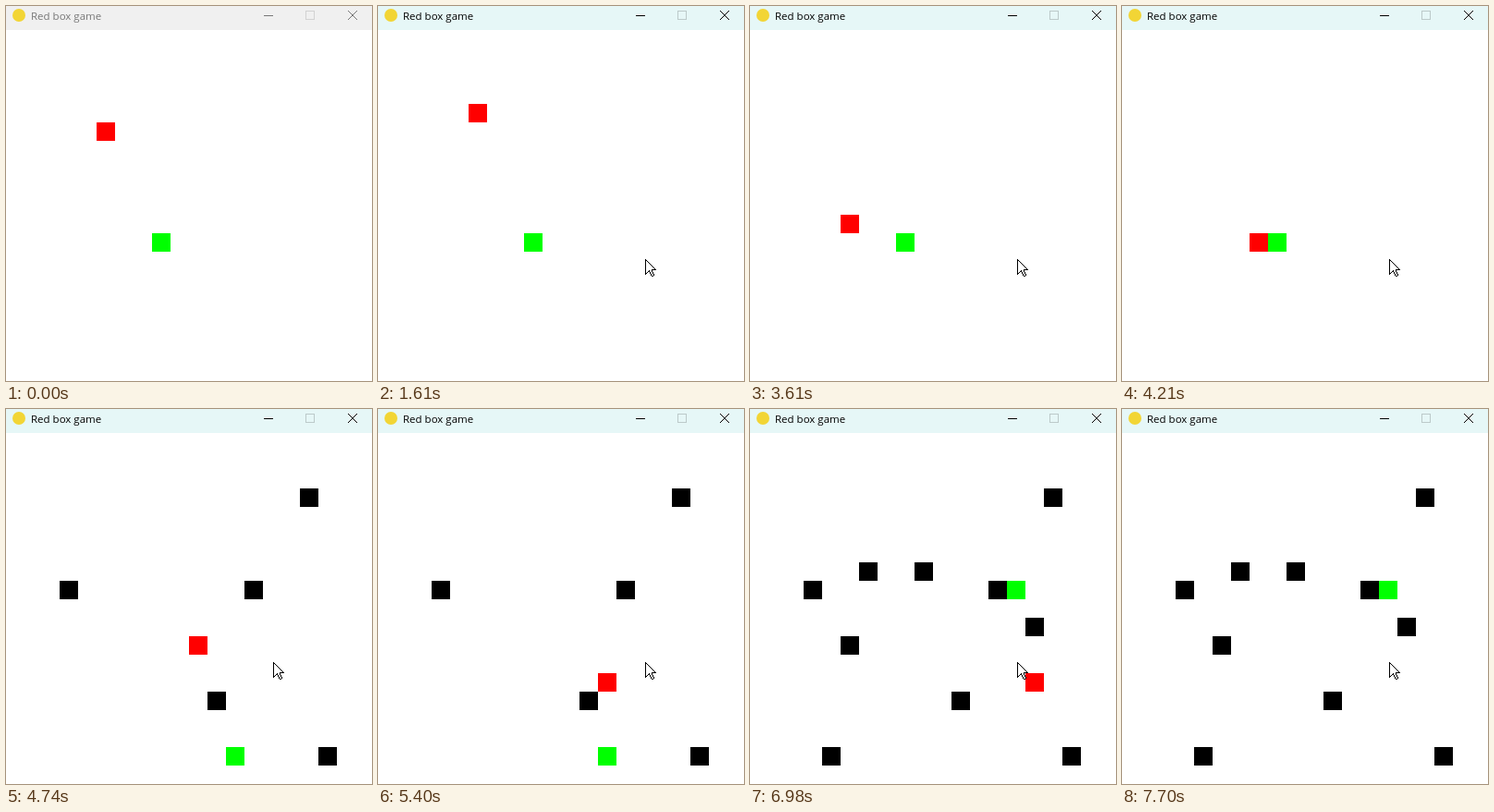
Recreate the animation shown at these times as an HTML page with a canvas. Size 396 by 406 pixels, loop 8 s.

```html
<!DOCTYPE html>
<html lang="en">
<head>
<meta charset="utf-8">
<title>Red box game</title>
<style>
  html, body { margin: 0; width: 100%; height: 100%; overflow: hidden; background: #fff; }
  canvas { display: block; }
</style>
</head>
<body>
<canvas id="stage" width="396" height="406"></canvas>
<script>
const ctx = document.getElementById('stage').getContext('2d');
const LOOP = 8000;
const CELL = 20;
const ORIGIN = { x: -2, y: 26 };
const DIRS = { U: [0, -1], D: [0, 1], R: [1, 0] };

// Steering of the red box, and how long it waits between moves
const ROUTE = 'U'.repeat(3) + 'D'.repeat(9) + 'R'.repeat(7) +
              'D'.repeat(6) + 'U'.repeat(4) + 'R'.repeat(8);
const PACE = [
  { from: 1610, waits: [200] },
  { from: 4410, waits: [130, 200] },
  { from: 5730, waits: [140, 130, 200] },
  { from: 6200, waits: [130, 130, 130, 130, 130, 130, 200] }
];

// Each round places one food and adds its walls, as [column, row]
const ROUNDS = [
  { food: [8, 11], walls: [] },
  { food: [12, 17], walls: [[16, 3], [3, 8], [13, 8], [11, 14], [17, 17]] },
  { food: [14, 8], walls: [[6, 7], [9, 7], [15, 10], [5, 11], [4, 17]] }
];

const ACTIVE_AT = 480;
const POINTER = { start: 130, end: 410, tick: 70, from: [300, 353], to: [289, 274] };

const same = (a, b) => a[0] === b[0] && a[1] === b[1];

// Plays the game once: walls come with the hit, the new food one move later
function play() {
  let t = PACE[0].from, red = [5, 5], food = 0, round = 0, beat = 0, pace = PACE[0];
  const states = [{ at: 0, red, food, round }];
  for (const key of ROUTE) {
    red = red.map((v, i) => v + DIRS[key][i]);
    food = round;
    if (same(red, ROUNDS[food].food)) round++;
    states.push({ at: t, red, food, round });

    const next = PACE.filter(p => p.from <= t).pop();
    if (next !== pace) [pace, beat] = [next, 0];
    t += pace.waits[beat++ % pace.waits.length];
  }
  return states;
}
const STATES = play();

function box([col, row], color) {
  ctx.fillStyle = color;
  ctx.fillRect(ORIGIN.x + col * CELL, ORIGIN.y + row * CELL, CELL, CELL);
}

function line(color, x1, y1, x2, y2) {
  ctx.strokeStyle = color;
  ctx.lineWidth = 1;
  ctx.beginPath();
  ctx.moveTo(x1, y1);
  ctx.lineTo(x2, y2);
  ctx.stroke();
}

// Line without smoothing
function crispLine([x1, y1], [x2, y2]) {
  const n = Math.max(Math.abs(x2 - x1), Math.abs(y2 - y1));
  for (let i = 0; i <= n; i++) {
    const p = i / n;
    ctx.fillRect(Math.floor(x1 + (x2 - x1) * p + 0.01), Math.floor(y1 + (y2 - y1) * p + 0.01), 1, 1);
  }
}

function titleBar(active) {
  const ink = active ? '#000' : '#777';
  ctx.fillStyle = active ? '#e6f7f7' : '#f0f0f0';
  ctx.fillRect(0, 0, 396, 26);

  ctx.fillStyle = '#f2d535';
  ctx.beginPath();
  ctx.arc(14, 10, 7, 0, Math.PI * 2);
  ctx.fill();

  ctx.fillStyle = ink;
  ctx.font = '11.5px "Open Sans", "Noto Sans", sans-serif';
  ctx.fillText('Red box game', 27, 15);

  line(ink, 279, 10.5, 289, 10.5);
  ctx.strokeStyle = active ? '#bccaca' : '#d2d2d2';
  ctx.strokeRect(324.5, 5.5, 9, 9);
  line(ink, 370, 5, 380, 15);
  line(ink, 380, 5, 370, 15);
}

function pointer(t) {
  const { start, end, tick, from, to } = POINTER;
  if (t < start) return;
  const step = Math.floor((t - start) / tick) * tick;
  const p = Math.min(1, step / (end - start));
  const ease = 1 - (1 - p) ** 2;
  const [x, y] = from.map((v, i) => Math.round(v + (to[i] - v) * ease));
  const shape = [[0, 0], [0, 16], [4, 12], [7, 18], [8, 18], [9.5, 17], [7, 12], [7, 11], [11, 11]];

  ctx.save();
  ctx.translate(x, y);
  ctx.fillStyle = '#fff';
  ctx.beginPath();
  shape.forEach(([px, py]) => ctx.lineTo(px + 0.5, py + 0.5));
  ctx.fill();
  ctx.fillStyle = '#000';
  shape.forEach((pt, i) => crispLine(pt, shape[(i + 1) % shape.length]));
  ctx.restore();
}

function draw(t) {
  const state = STATES.filter(s => s.at <= t).pop();
  ctx.fillStyle = '#fff';
  ctx.fillRect(0, 0, 396, 406);
  titleBar(t >= ACTIVE_AT);
  box(ROUNDS[state.food].food, '#0f0');
  box(state.red, '#f00');
  for (const { walls } of ROUNDS.slice(0, state.round + 1)) {
    walls.forEach(cell => box(cell, '#000'));
  }
  pointer(t);
}

const begin = performance.now();
function frame() {
  draw((performance.now() - begin) % LOOP);
  requestAnimationFrame(frame);
}
frame();
</script>
</body>
</html>
```
